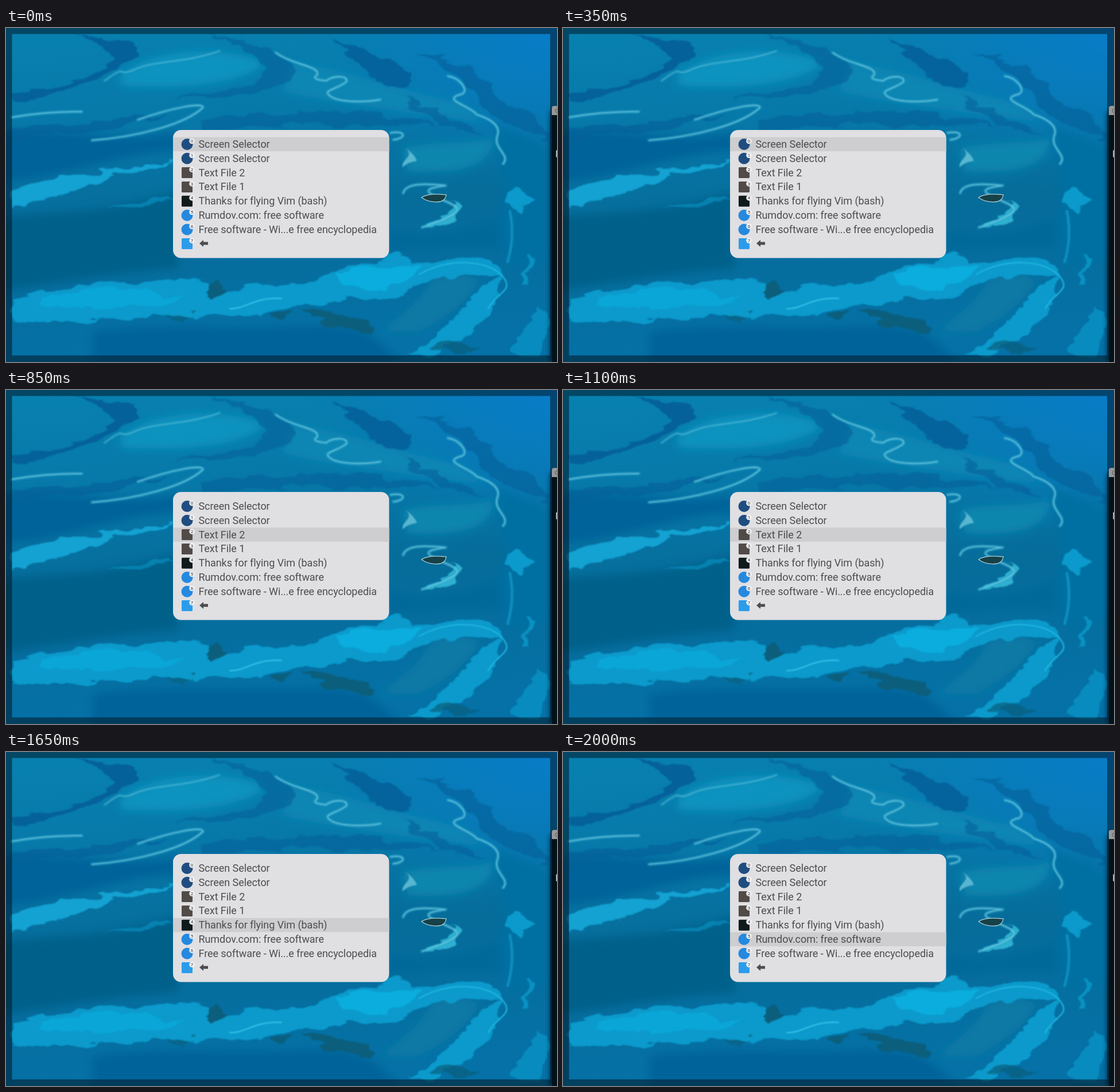
An HTML page for the animation above (2.05 s loop, 960x583 px).

```html
<!DOCTYPE html>
<html lang="en">
<head>
<meta charset="utf-8">
<title>Window switcher</title>
<style>
  html, body { margin: 0; width: 100%; height: 100%; overflow: hidden; background: #05506f; }
  svg { display: block; width: 960px; height: 583px; }
  .label { font: 18px Roboto, Inter, sans-serif; letter-spacing: -.07px; fill: #4d4c4e; }
  .badge { font: 8px Roboto, Inter, sans-serif; fill: #333; text-anchor: middle; }
  .line { fill: none; stroke-linecap: round; stroke-linejoin: round; }
</style>
</head>
<body>
<svg viewBox="0 0 960 583">
  <defs>
    <linearGradient id="sea" x2=".12" y2="1">
      <stop offset="0" stop-color="#0881b0"/>
      <stop offset=".3" stop-color="#0779a9"/>
      <stop offset=".6" stop-color="#066c9a"/>
      <stop offset="1" stop-color="#0571a6"/>
    </linearGradient>
    <radialGradient id="sky" cx="1" cy="0" r=".45">
      <stop offset="0" stop-color="#087cc8"/>
      <stop offset="1" stop-color="#087cc8" stop-opacity="0"/>
    </radialGradient>
    <filter id="wide" x="-20%" y="-20%" width="140%" height="140%"><feGaussianBlur stdDeviation="8"/></filter>
    <!-- noise bends the edges like drifting water -->
    <filter id="soft" x="-10%" y="-10%" width="120%" height="120%" color-interpolation-filters="sRGB">
      <feTurbulence type="fractalNoise" baseFrequency=".02 .045" numOctaves="3" seed="4"/>
      <feDisplacementMap in="SourceGraphic" scale="26" xChannelSelector="R" yChannelSelector="G"/>
      <feGaussianBlur stdDeviation="1.2"/>
    </filter>
    <filter id="fine" x="-20%" y="-20%" width="140%" height="140%"><feGaussianBlur stdDeviation=".9"/></filter>
    <filter id="shade" x="-300%" width="700%"><feGaussianBlur stdDeviation="5"/></filter>
  </defs>

  <!-- sea: broad tones -->
  <rect width="960" height="583" fill="url(#sea)"/>
  <rect width="960" height="583" fill="url(#sky)"/>
  <g filter="url(#wide)" fill="#05639a">
    <path d="M-20 185C100 168 210 205 300 180V215C190 218 110 262 -20 270Z"/>
    <path d="M-20 330C90 320 180 325 300 285V420C200 425 90 445 -20 460Z" fill="#05608a"/>
    <path d="M150 530C250 515 400 525 520 520S640 545 690 583H150Z"/>
    <path d="M850 170C900 190 970 200 970 260V400L880 420C860 370 850 330 870 290Z" fill="#066fa2"/>
    <path d="M665 350C730 370 800 355 860 330V385C790 380 730 385 665 390Z" fill="#06699a"/>
    <path d="M740 440C770 425 810 430 825 440C810 470 780 500 720 530H650C690 500 720 480 740 440Z" fill="#0879a4"/>
    <path d="M200 80C260 35 380 30 450 60C430 90 330 110 200 100Z" fill="#0c93bf"/>
    <path d="M500 60C590 70 680 110 790 130L840 165C720 150 560 130 480 110Z" fill="#0a86b4"/>
    <path d="M690 210C760 195 820 205 850 190C845 240 800 255 700 250Z" fill="#0b86ae"/>
  </g>

  <!-- currents -->
  <g filter="url(#soft)">
    <g fill="#05619a">
      <path d="M110 10C230 15 255 40 187 72C155 104 80 112 10 128V114C80 105 130 97 165 72C208 42 170 25 110 10Z"/>
      <path d="M350 10C480 30 540 70 480 100C400 122 340 130 290 125C390 108 470 92 450 65C430 38 390 25 350 10Z" opacity=".6"/>
      <path d="M565 20C620 45 690 55 712 95C705 112 660 102 630 80C605 60 605 45 565 20Z" opacity=".9"/>
      <path d="M715 40C790 50 830 80 850 115C900 150 930 160 948 195C890 175 840 155 825 130C800 95 780 70 715 40Z" opacity=".65"/>
      <path d="M10 172C90 162 200 165 280 150C220 180 90 185 10 198Z" opacity=".7"/>
      <path d="M340 165C420 140 500 150 600 145C680 150 720 165 760 172C640 170 480 168 340 178Z" opacity=".6"/>
      <path d="M690 120C740 135 790 160 840 185C780 180 720 160 690 120Z" opacity=".6"/>
    </g>
    <g fill="#0b9acb">
      <path d="M10 472C110 446 210 442 300 440C350 430 365 465 400 455C440 448 490 450 530 440C570 430 570 420 595 415C640 410 675 392 700 400C690 424 745 408 775 403C820 398 862 412 866 432C800 424 755 425 715 455C670 485 640 472 600 468C560 480 510 485 470 490C400 516 290 495 210 506S80 510 10 516Z"/>
      <path d="M866 431C840 440 822 448 804 480C780 520 740 540 692 571H740C795 553 842 510 853 475Q866 452 866 431Z"/>
      <path d="M10 285C60 274 85 250 125 255C190 250 240 238 290 232C240 256 190 252 145 274C100 295 50 304 10 312Z" fill="#13a2d2"/>
      <path d="M175 312Q240 294 290 295Q235 319 175 312Z" opacity=".55"/>
      <path d="M875 288L895 280L920 296L905 306L890 320L876 308Z"/>
      <path d="M908 394L917 405L909 445L900 448Z" opacity=".8"/>
      <path d="M930 485C915 510 895 530 880 570H925L948 510Z" opacity=".65"/>
      <path d="M735 340C780 325 790 305 765 300C810 306 800 335 735 348Z" fill="#2fb0d0"/>
    </g>
    <path d="M570 425C650 412 690 415 725 418C690 450 650 472 590 450Z" fill="#0bb5e6" opacity=".7"/>
    <path d="M60 470C160 450 240 455 310 470C240 490 130 490 60 485Z" fill="#0bb0e2" opacity=".6"/>
    <g fill="#0b5f7c">
      <path d="M348 462L368 442L385 455L362 476Z"/>
      <path d="M465 494H495L480 514Z"/>
      <path d="M510 495C560 492 600 503 645 523L640 538C600 525 555 515 510 495Z"/>
      <path d="M735 556L775 545L825 560L800 570Z" opacity=".7"/>
      <path d="M275 502H325L310 516Z" opacity=".6"/>
    </g>
  </g>

  <!-- pale sand lines, each with a faint glow -->
  <defs>
    <g id="sand">
      <path d="M10 156Q72 145 132 146"/>
      <path d="M150 196C230 190 312 168 343 139C344 129 290 139 230 160"/>
      <path d="M172 92C215 60 190 88 225 72S310 62 372 40" opacity=".6"/>
      <path d="M470 43C500 65 548 66 542 82Q530 90 558 92C570 83 597 82 593 94C575 108 550 108 565 119S625 130 652 125"/>
      <path d="M770 84C790 87 807 108 795 115C755 125 808 135 820 151C842 158 863 170 856 188C848 210 880 222 866 237"/>
      <path d="M670 183C695 178 700 192 675 195"/>
      <path d="M692 288C697 269 735 272 766 275C720 281 733 288 765 302S792 320 760 335L725 348"/>
    </g>
  </defs>
  <g class="line" filter="url(#fine)">
    <use href="#sand" stroke="#2ba6cb" stroke-width="7" opacity=".4"/>
    <use href="#sand" stroke="#6fcbe2" stroke-width="2" opacity=".85"/>
    <path d="M720 430C770 400 840 405 864 432S855 460 840 490" stroke="#22b4e0" stroke-width="2.500"/>
    <path d="M878 320C886 360 879 390 874 408" stroke="#0e8cc0" stroke-width="5"/>
    <path d="M390 490C420 490 430 470 480 472" stroke="#31c0e8" stroke-width="2.500"/>
  </g>
  <path d="M691 243C688 228 716 224 693 207Q712 220 716 232Q700 234 691 243Z" fill="#58b6d0" filter="url(#fine)"/>
  <path d="M724 296Q734 288 767 291Q766 300 757 303Q738 306 724 296Z" fill="#174149" stroke="#a7cdd0" stroke-width="1.300"/>

  <!-- dimmed rim and the neighbouring window -->
  <path d="M0 0H960V583H0ZM10.500 10.500V571.500H948V10.500Z" fill-rule="evenodd" fill="#001522" fill-opacity=".52"/>
  <rect x="949" y="145" width="14" height="438" fill="#001018" opacity=".8" filter="url(#shade)"/>
  <rect x="951" y="152" width="9" height="431" fill="#02121a"/>
  <path d="M951 152V140Q951 136 955 136H960V152Z" fill="#989899"/>
  <circle cx="960" cy="144.500" r="3" fill="none" stroke="#555"/>
  <rect x="958.500" y="213.500" width="1.500" height="12" fill="#d8dcdd"/>

  <!-- switcher -->
  <rect x="291" y="178" width="376.500" height="223.500" rx="14" fill="#e0dfe2"/>
  <rect id="bar" x="291" y="190.600" width="376.500" height="24.500" fill="#cecdd0"/>
  <g id="list"></g>
</svg>
<script>
const PITCH = 24.8, LOOP = 2050, STEP = 350, FIRST = 500;
const rows = [
  ["Screen Selector", "circle", "#204d80"],
  ["Screen Selector", "circle", "#204d80"],
  ["Text File 2", "square", "#514b48"],
  ["Text File 1", "square", "#514b48"],
  ["Thanks for flying Vim (bash)", "square", "#101a1b"],
  ["Rumdov.com: free software", "circle", "#2589df"],
  ["Free software - Wi...e free encyclopedia", "circle", "#2589df"],
  ["", "square", "#2c9cea"]
];

const icon = (shape, color) => shape === "circle"
  ? `<circle cx="315.5" cy="203" r="10" fill="${color}"/>`
  : `<rect x="306" y="193.5" width="19" height="19" rx="1.5" fill="${color}"/>`;

const arrow = `<path d="M337 202.500L344 196.500V200H352V205H344V208.500Z" fill="#4d4c4e"/>`;

list.innerHTML = rows.map(([label, shape, color], i) => `
  <g transform="translate(0 ${i * PITCH})">
    ${icon(shape, color)}
    <circle cx="324" cy="197.500" r="4.800" fill="#f1f0f2"/>
    <text class="badge" x="324" y="200.300">${i}</text>
    ${label ? `<text class="label" x="335.500" y="209">${label}</text>` : arrow}
  </g>`).join("");

function draw(now) {
  const t = now % LOOP;
  const selected = Math.max(0, Math.floor((t - FIRST) / STEP) + 1);
  bar.setAttribute("transform", `translate(0 ${selected * PITCH})`);
  requestAnimationFrame(draw);
}
draw(performance.now());
</script>
</body>
</html>
```
